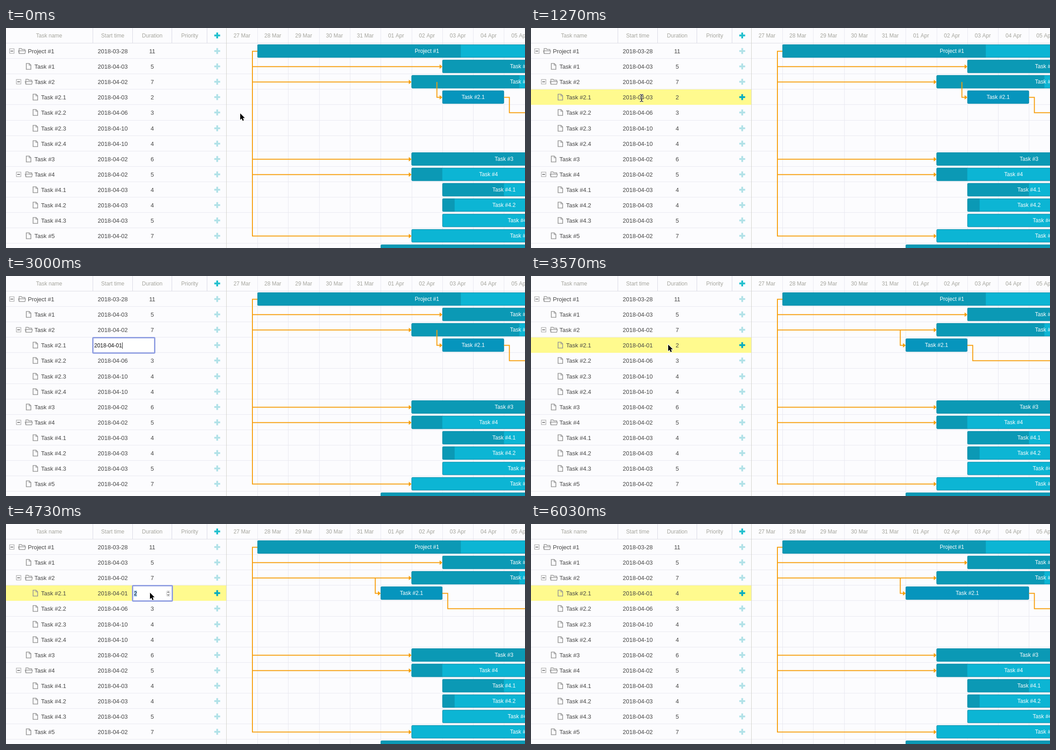
An HTML page with a canvas for the animation above (6060 ms loop, 1150 by 487 pixels).

```html
<!DOCTYPE html>
<html lang="en">
<head>
<meta charset="utf-8">
<title>Gantt inline editing</title>
<style>
html, body { margin: 0; width: 100%; height: 100%; overflow: hidden; background: #fcfcfe; }
canvas { display: block; }
</style>
</head>
<body>
<canvas id="stage" width="1150" height="487"></canvas>
<script>
const ctx = document.getElementById('stage').getContext('2d');
const W = 1150, H = 487, LOOP = 6060;
const ROW = 34.1, DAY = 68.3, LEFT = 488.7, DAY0 = 557;
const FONT = '"Liberation Sans", Arial, sans-serif';
const DARK = '#0b99b5', LIGHT = '#0cb5d4', EDGE = '#0b87a3';
const LINK = '#f79d08', LINE = '#e8e8f0', INK = '#454545';

// Moments of the interaction, in ms
const T = {
  openDate: 1500, nudge: 1800, caret: 1960, erase: 2560, typeDay: 2800, saveDate: 3130, show: 3270,
  openDur: 4300, typeDur: 5250, saveDur: 5700
};

// name, level, has children, start day (28 Mar = 0), duration, progress
const tasks = [
  ['Project #1', 0, 1, 0, 11, .6],
  ['Task #1', 1, 0, 6, 5, 1],
  ['Task #2', 1, 1, 5, 7, .5],
  ['Task #2.1', 2, 0, 6, 2, 1],
  ['Task #2.2', 2, 0, 9, 3, .8],
  ['Task #2.3', 2, 0, 13, 4, .2],
  ['Task #2.4', 2, 0, 13, 4, 0],
  ['Task #3', 1, 0, 5, 6, .8],
  ['Task #4', 1, 1, 5, 5, .2],
  ['Task #4.1', 2, 0, 6, 4, .5],
  ['Task #4.2', 2, 0, 6, 4, .1],
  ['Task #4.3', 2, 0, 6, 5, 0],
  ['Task #5', 1, 0, 5, 7, 0],
  ['Project #2', 0, 1, 4, 11, 1]
].map(([name, level, parent, start, days, done]) => ({ name, level, parent, start, days, done }));
const EDITED = 3;

// time, x, y of the pointer
const path = [
  [0, 519, 189], [200, 519, 189], [730, 306, 160], [1050, 245, 155],
  [T.nudge, 245, 155], [1930, 257, 155], [T.show, 257, 155],
  [3570, 304, 152], [3800, 319, 152], [LOOP, 319, 152]
];

const rowY = i => 51 + ROW * i;
const dayX = d => DAY0 + DAY * d;
const pad = n => String(n).padStart(2, '0');
const dateText = d => d < 4 ? '2018-03-' + (28 + d) : '2018-04-' + pad(d - 3);

function pointer(t) {
  const i = Math.max(1, path.findIndex(p => p[0] > t));
  const [t0, x0, y0] = path[i - 1], [t1, x1, y1] = path[i];
  const k = (t - t0) / (t1 - t0), e = k * k * (3 - 2 * k);
  return { x: x0 + (x1 - x0) * e, y: y0 + (y1 - y0) * e };
}

function text(s, x, y, size, color, align = 'left') {
  ctx.font = size + 'px ' + FONT;
  ctx.fillStyle = color;
  ctx.textAlign = align;
  ctx.fillText(s, x, y);
}

function rect(x, y, w, h, color) {
  ctx.fillStyle = color;
  ctx.fillRect(x, y, w, h);
}

function stroke(points, color, width, closed) {
  ctx.beginPath();
  points.forEach(([x, y]) => ctx.lineTo(x, y));
  if (closed) ctx.closePath();
  ctx.strokeStyle = color;
  ctx.lineWidth = width;
  ctx.stroke();
}

function fillPoly(points, color) {
  ctx.beginPath();
  points.forEach(([x, y]) => ctx.lineTo(x, y));
  ctx.fillStyle = color;
  ctx.fill();
}

function plus(x, y, color) {
  rect(x - 6.5, y - 2, 13, 4, color);
  rect(x - 2, y - 6.5, 4, 13, color);
}

function folder(x, y) {
  const at = pts => pts.map(([a, b]) => [x + a, y + b]);
  stroke(at([[-6.5, 5.5], [-6.5, -5.5], [-1.5, -5.5], [0, -3.5], [6.5, -3.5], [6.5, -.5]]), '#969696', 1.4);
  stroke(at([[-8, -.5], [8, -.5], [6.5, 5.5], [-6.5, 5.5]]), '#969696', 1.4, true);
}

function file(x, y) {
  const at = pts => pts.map(([a, b]) => [x + a, y + b]);
  stroke(at([[-5, -6.5], [1.5, -6.5], [5.2, -2.8], [5.2, 6.5], [-5, 6.5]]), '#969696', 1.6, true);
  stroke(at([[1.2, -6.5], [1.2, -2.5], [5.2, -2.5]]), '#969696', 1.2);
}

function toggle(x, y) {
  ctx.strokeStyle = '#9a9a9a';
  ctx.lineWidth = 1;
  ctx.strokeRect(x - 5, y - 5, 10, 10);
  rect(x - 3, y - .5, 6, 1.2, '#333');
}

function grid() {
  for (let i = 1; i < 14; i++) rect(0, Math.round(33 + ROW * i), W, 1, LINE);
  for (let d = 0; d < 9; d++) {
    rect(Math.round(dayX(d)), 0, 1, H, LINE);
  }
  rect(0, 33, W, 1, '#dcdce4');
  [192, 280, 367, 445].forEach(x => rect(x, 0, 1, 33, '#d8d8e4'));
  rect(488, 0, 1, H, '#d2d3ca');
}

function header() {
  const gray = '#a5a59d';
  [['Task name', 95.5], ['Start time', 236.5], ['Duration', 324], ['Priority', 407]]
    .forEach(([s, x]) => text(s, x, 20.5, 12, gray, 'center'));
  plus(468, 16.5, '#21c0ce');
  for (let i = 0; i < 10; i++) {
    const label = i < 5 ? 27 + i + ' Mar' : pad(i - 4) + ' Apr';
    text(label, LEFT + DAY * (i + .5), 20.5, 12, gray, 'center');
  }
}

function tableRow(task, i, hover) {
  const y = Math.round(rowY(i)), base = y + 4.7, x = 15 * task.level;
  if (task.parent) {
    toggle(13 + x, y);
    folder(35.5 + x, y);
  } else {
    file(35 + x, y);
  }
  text(task.name, 48.5 + 14.6 * task.level, base, 13, INK);
  text(dateText(task.start), 236.5, base, 13, INK, 'center');
  text(task.days, 324, base, 13, INK, 'center');
  plus(468, y, hover ? '#08adbf' : '#b2e2e8');
}

function bar(task, i) {
  const x = dayX(task.start), y = Math.round(rowY(i)) - 14.5, w = DAY * task.days, h = 29;
  ctx.save();
  ctx.beginPath();
  ctx.roundRect(x, y, w, h, 2);
  ctx.clip();
  rect(x, y, w, h, LIGHT);
  rect(x, y, w * task.done, h, i === EDITED ? '#0695bd' : DARK);
  ctx.restore();
  ctx.beginPath();
  ctx.roundRect(x + .5, y + .5, w - 1, h - 1, 2);
  ctx.strokeStyle = EDGE;
  ctx.lineWidth = 1;
  ctx.stroke();
  text(task.name, x + w / 2, y + 18.8, 12, '#fff', 'center');
}

function arrow(x, y) {
  fillPoly([[x - 6, y - 5], [x, y], [x - 6, y + 5]], LINK);
}

function links(list) {
  const line = pts => stroke(pts, LINK, 2);
  const mid = i => Math.round(rowY(i)) + .5;
  const x0 = 546;
  line([[DAY0, mid(0)], [x0, mid(0)], [x0, mid(12)]]);
  [1, 2, 7, 8, 12].forEach(i => {
    const x = dayX(list[i].start);
    line([[x0 - 1, mid(i)], [x - 5, mid(i)]]);
    arrow(x, mid(i));
  });
  const edited = list[EDITED], start = dayX(edited.start), end = dayX(edited.start + edited.days);
  line([[start - 12, mid(2)], [start - 12, mid(3)], [start - 5, mid(3)]]);
  arrow(start, mid(3));
  line([[end, mid(3)], [end + 12, mid(3)], [end + 12, mid(4)], [W + 10, mid(4)]]);
}

function editor(x, w, value, selected, caret) {
  ctx.beginPath();
  ctx.roundRect(x, 135, w, 37, 3);
  ctx.fillStyle = '#919fe2';
  ctx.fill();
  rect(x + 3, 138, w - 6, 31, '#fff');
  ctx.font = '12px ' + FONT;
  const len = ctx.measureText(value).width;
  if (selected) rect(x + 4.5, 147, len, 14, '#a9d2f8');
  text(value, x + 4.5, 158, 12, '#111');
  if (caret) rect(x + 5 + len, 147, 1, 14, '#111');
}

function spinner() {
  ctx.beginPath();
  ctx.roundRect(355.5, 147.5, 8, 13, 3.5);
  ctx.fillStyle = '#fff';
  ctx.fill();
  ctx.strokeStyle = '#c4c4c4';
  ctx.lineWidth = 1;
  ctx.stroke();
  stroke([[357.5, 152], [359.5, 150], [361.5, 152]], '#444', 1.1);
  stroke([[357.5, 156], [359.5, 158], [361.5, 156]], '#444', 1.1);
}

function arrowCursor(x, y) {
  const shape = [[0, 0], [0, 14.2], [3.2, 11.2], [5.4, 16.4], [8, 15.3], [5.8, 10.2], [10.2, 10.2]]
    .map(([a, b]) => [x + a, y + b]);
  stroke(shape, '#fff', 2, true);
  fillPoly(shape, '#000');
}

function beamCursor(x, y) {
  const draw = (color, width) => {
    stroke([[x, y - 6], [x, y + 6]], color, width);
    stroke([[x - 3.5, y - 8], [x - 1.5, y - 7.5], [x, y - 6], [x + 1.5, y - 7.5], [x + 3.5, y - 8]], color, width);
    stroke([[x - 3.5, y + 8], [x - 1.5, y + 7.5], [x, y + 6], [x + 1.5, y + 7.5], [x + 3.5, y + 8]], color, width);
    stroke([[x - 2, y + 2.5], [x + 2, y + 2.5]], color, width);
  };
  draw('#fff', 3);
  draw('#111', 1.3);
}

function render(t) {
  const list = tasks.map(task => ({ ...task }));
  if (t >= T.saveDate) list[EDITED].start = 4;
  if (t >= T.saveDur) list[EDITED].days = 4;

  const within = (a, b) => t >= a && t < b;
  const p = pointer(t);
  const overEditor = within(T.nudge, T.saveDate);
  const hover = p.x < 488 && !overEditor ? Math.floor((p.y - 34) / ROW) : -1;

  rect(0, 0, W, H, '#fcfcfe');
  grid();
  if (hover >= 0) rect(0, Math.round(34 + ROW * hover), 488, 34, '#fffa8e');
  header();
  list.forEach((task, i) => tableRow(task, i, i === hover));
  list.forEach(bar);
  links(list);

  if (within(T.openDate, T.saveDate)) {
    const value = t < T.erase ? '2018-04-03' : t < T.typeDay ? '2018-04-0' : '2018-04-01';
    editor(191, 140, value, t < T.caret, t >= T.erase);
  }
  if (within(T.openDur, T.saveDur)) {
    const typed = t >= T.typeDur;
    editor(279, 91, typed ? '4' : '2', !typed, typed);
    spinner();
  }

  const hidden = within(T.erase, T.show) || t >= T.typeDur;
  if (hidden) return;
  const overText = p.x > 204 && p.x < 269 && t > T.openDate - 600;
  (overText ? beamCursor : arrowCursor)(p.x, p.y);
}

const begin = performance.now();
function tick() {
  render((performance.now() - begin) % LOOP);
  requestAnimationFrame(tick);
}
tick();
</script>
</body>
</html>
```
